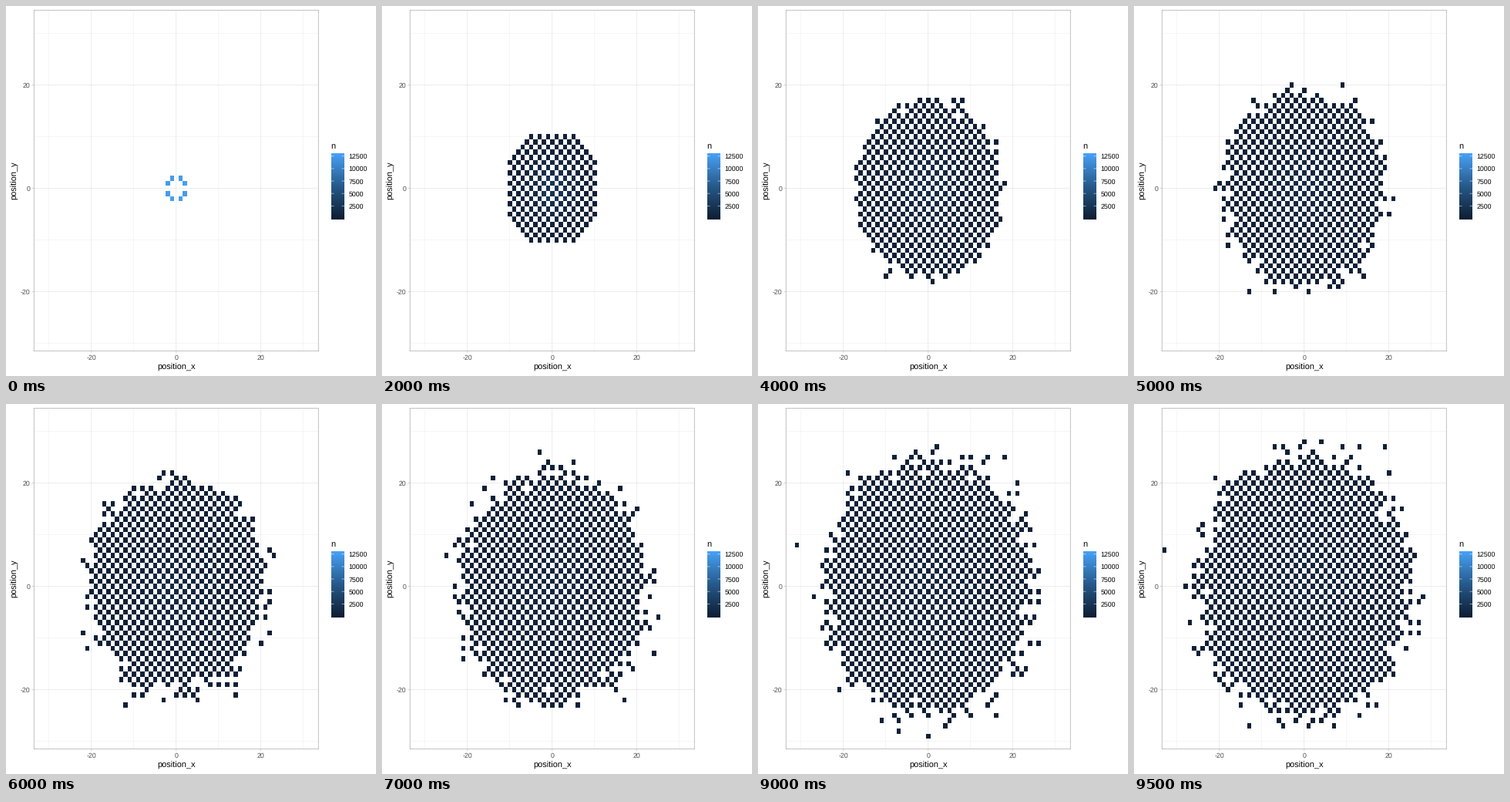
A matplotlib script that plays this animation: 480 px wide and 480 px high, repeating every 10000 ms.

```python
import numpy as np
import matplotlib
import matplotlib.pyplot as plt
from matplotlib.animation import FuncAnimation
from matplotlib.colors import LinearSegmentedColormap
from matplotlib.lines import Line2D

matplotlib.rcParams["font.family"] = "Liberation Sans"
matplotlib.rcParams["text.hinting"] = "none"

SIZE = 480
DPI = 72
LEFT, RIGHT, TOP, BOTTOM = 36.3, 405.3, 5.5, 447.6
X_LIM = (-33.55, 33.55)
Y_LIM = (-31.5, 34.5)
WALKERS = 100_000
MOVES = 20
REACH = 2 * MOVES
BLUES = LinearSegmentedColormap.from_list(
    "blues", ["#0f2036", "#275a8b", "#479ff3"])


def knight_walk():
    """Walkers per cell after each knight move, all starting at the origin."""
    rng = np.random.default_rng(20)
    steps = np.array([(dx, dy) for dx in (-2, -1, 1, 2)
                      for dy in (-2, -1, 1, 2) if abs(dx) != abs(dy)])
    position = np.zeros((WALKERS, 2), int)
    width = 2 * REACH + 1
    history = []
    for _ in range(MOVES):
        position += steps[rng.integers(8, size=WALKERS)]
        x, y = position.T + REACH
        counts = np.bincount(y * width + x, minlength=width ** 2)
        history.append(np.ma.masked_equal(counts.reshape(width, width), 0))
    return history


def box(left, top, right, bottom):
    return [left / SIZE, 1 - bottom / SIZE,
            (right - left) / SIZE, (bottom - top) / SIZE]


def label(x, y, text, size=8.8, color="black", **kwargs):
    fig.text(x / SIZE, 1 - y / SIZE, text, fontsize=size, color=color,
             va="baseline", **kwargs)


def line(x0, y0, x1, y1, color, width=0.53):
    fig.add_artist(Line2D([x0 / SIZE, x1 / SIZE],
                          [1 - y0 / SIZE, 1 - y1 / SIZE], color=color,
                          lw=width, solid_capstyle="butt", snap=False))


def draw_panel():
    ax = fig.add_axes(box(LEFT, TOP, RIGHT, BOTTOM))
    ax.set(xticks=[], yticks=[])
    for v in range(-30, 31, 10):
        width = 0.53 if v % 20 == 0 else 0.27
        style = dict(color="#dedede", lw=width, zorder=0, snap=False)
        ax.axvline(v, **style)
        ax.axhline(v, **style)
    for spine in ax.spines.values():
        spine.set(color="#b3b3b3", linewidth=0.8, snap=False)
    return ax


def draw_axis_labels():
    grey, tick = "#4d4d4d", "#b3b3b3"
    x_unit = (RIGHT - LEFT) / (X_LIM[1] - X_LIM[0])
    y_unit = (BOTTOM - TOP) / (Y_LIM[1] - Y_LIM[0])
    for v in (-20, 0, 20):
        x = LEFT + (v - X_LIM[0]) * x_unit
        y = TOP + (Y_LIM[1] - v) * y_unit
        line(x, BOTTOM, x, BOTTOM + 2.75, tick)
        line(LEFT - 2.75, y, LEFT, y, tick)
        label(x, 459, v, color=grey, ha="center")
        label(31.3, y + 3.2, v, color=grey, ha="right")
    label((LEFT + RIGHT) / 2, 472, "position_x", 11, ha="center")
    label(14.4, (TOP + BOTTOM) / 2, "position_y", 11, ha="center",
          rotation=90, rotation_mode="anchor")


def draw_legend(max_count):
    left, top, right, bottom = 422, 191, 439, 277
    bar = fig.add_axes(box(left, top, right, bottom))
    bar.axis("off")
    # The first and last half of the twenty colour bins stay flat.
    ramp = np.clip(np.linspace(-0.026, 1.026, 200), 0, 1)
    bar.imshow(ramp[:, None], cmap=BLUES, vmin=0, vmax=1, origin="lower",
               aspect="auto")
    label(421.6, 185, "n", 11)
    for v in range(2500, 12501, 2500):
        y = bottom + 0.5 - 86.4 * (0.025 + 0.95 * v / max_count)
        line(left, y, left + 3.4, y, "white")
        line(right - 3.4, y, right, y, "white")
        label(444.6, y + 3.4, v)


fig = plt.figure(figsize=(SIZE / DPI, SIZE / DPI), dpi=DPI, facecolor="white")
counts = knight_walk()
max_count = counts[0].max()
panel = draw_panel()
draw_axis_labels()
draw_legend(max_count)
edges = np.arange(-REACH, REACH + 2) - 0.5
tiles = panel.pcolormesh(edges, edges, counts[0], cmap=BLUES, vmin=1,
                         vmax=max_count, antialiased=False, zorder=2)
panel.set(xlim=X_LIM, ylim=Y_LIM)


def update(frame):
    tiles.set_array(counts[frame])
    return [tiles]


anim = FuncAnimation(fig, update, frames=MOVES, interval=500, repeat=True,
                     repeat_delay=0, blit=False)
plt.show()
```
